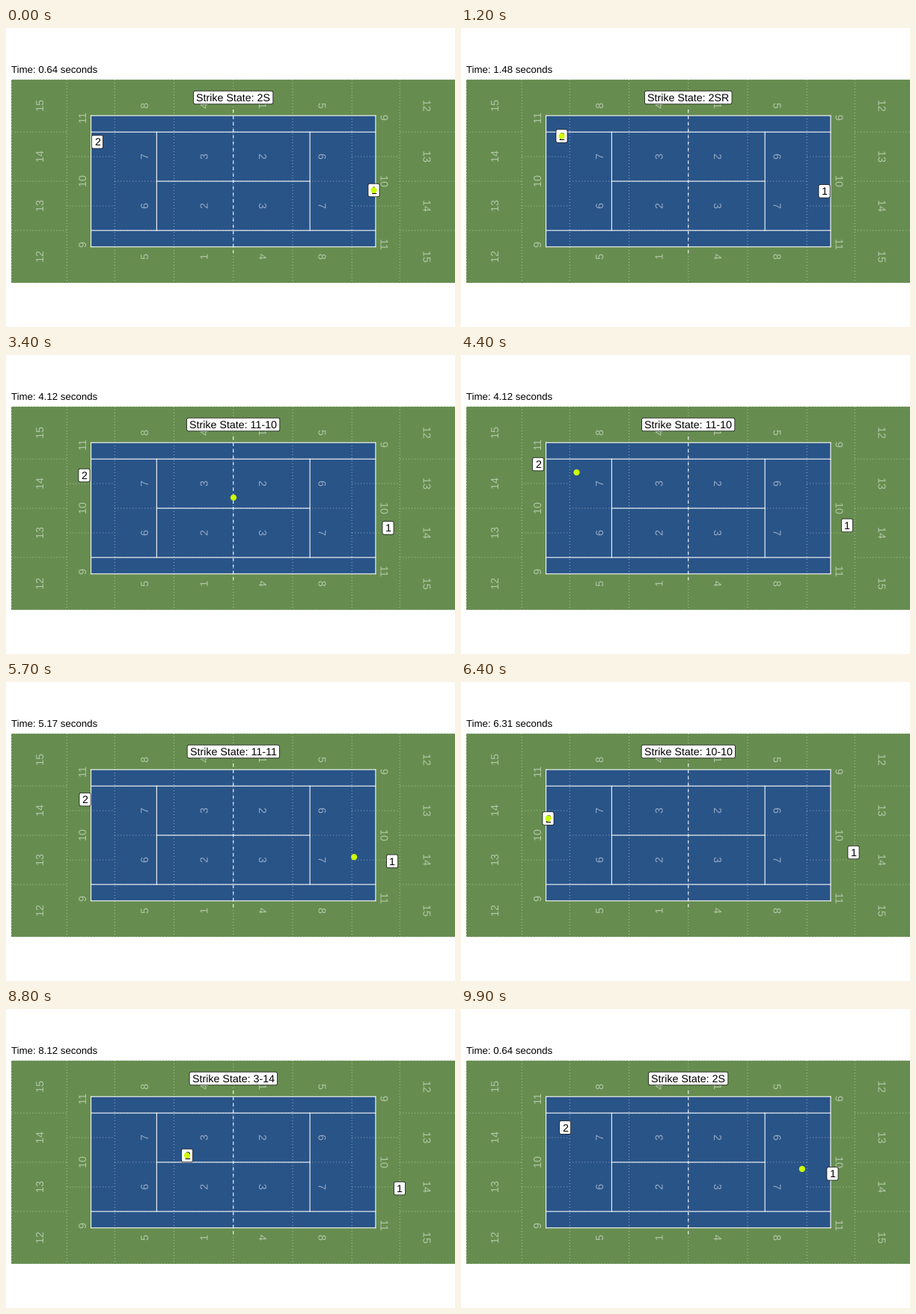
Write a matplotlib script that moves like this. It is 600 px wide and 400 px high and loops after 10000 ms.

```python
import matplotlib.pyplot as plt
import numpy as np
from matplotlib.animation import FuncAnimation
from matplotlib.patches import Circle, FancyBboxPatch, PathPatch, Rectangle
from matplotlib.textpath import TextPath
from matplotlib.transforms import Affine2D

W, H, DPI = 600, 400, 100
PX = 72 / DPI
GRASS, COURT, BALL = "#668d4f", "#295488", "#ccff00"
FONT, SIZE = "Liberation Sans", 14.23
CX, CY, METRE = 303.75, 205, 16  # court centre and scale
plt.rcParams["font.family"] = FONT
plt.rcParams["text.hinting"] = "none"

# Per stroke: clock, strike label, player 1, player 2.
# Player 1 hits the even strokes, player 2 the odd ones.
STROKES = [
    ("0.64", "2S", (491.5, 217), (122, 152.3)),
    ("1.48", "2SR", (485.5, 218.3), (134.5, 144.5)),
    ("2.89", "10-10", (505, 236.5), (106, 177)),
    ("4.12", "11-10", (516, 226), (103, 145)),
    ("5.17", "11-11", (515, 241.5), (104, 153.5)),
    ("6.31", "10-10", (524.5, 228), (116.5, 182.5)),
    ("7.31", "14-7", (535, 246), (163, 196)),
    ("8.12", "3-14", (526, 240), (242, 196)),
]
STARTS = [5, 18, 31, 44, 57, 70, 82, 94]
STEPS = [8, 8, 8, 8, 8, 7, 7, 7]

fig = plt.figure(figsize=(W / DPI, H / DPI), dpi=DPI, facecolor="white")
ax = fig.add_axes([0, 0, 1, 1])
ax.set_xlim(0, W)
ax.set_ylim(H, 0)
ax.axis("off")


def line(x0, y0, x1, y1, **style):
    opts = dict(color="white", lw=1.07 * PX, solid_capstyle="projecting",
                dash_capstyle="butt", snap=False, zorder=3)
    ax.plot([x0, x1], [y0, y1], **{**opts, **style})


def dotted(x0, y0, x1, y1):
    line(x0, y0, x1, y1, lw=PX, ls=(0, (1, 3)), alpha=0.5, zorder=2)


def zone(x, y, name, angle):
    """Faint number turned about its own centre."""
    path = TextPath((0, 0), str(name), size=SIZE, prop={"family": FONT})
    width = 0.556 * SIZE * len(str(name))
    place = (Affine2D().translate(-width / 2, -0.35 * SIZE).scale(1, -1)
             .rotate_deg(-angle).translate(x, y))
    ax.add_patch(PathPatch(place.transform_path(path), fc="white", lw=0,
                           alpha=0.5, zorder=4))


def draw_court():
    half_l, half_w = 11.885 * METRE, 5.485 * METRE
    singles, service, net = 4.115 * METRE, 6.4 * METRE, 6 * METRE
    left, right = CX - half_l, CX + half_l
    top, bottom = CY - half_w, CY + half_w

    ax.add_patch(Rectangle((7.3, 69), 593, 272, fc=GRASS, lw=0))
    ax.add_patch(Rectangle((left, top), 2 * half_l, 2 * half_w, fc=COURT,
                           lw=0, zorder=1, snap=False))

    for x in (7.5, 81.3, 145.3, 224.5, CX, 383, 462.2, 526.2):
        dotted(x, 69, x, 341)
    for y in (69.2, 340.8):
        dotted(7.5, y, 600, y)
    for y in (CY - singles, CY, CY + singles):
        dotted(7.5, y, 81.3, y)
        dotted(145.3, y, 462.2, y)
        dotted(526.2, y, 600, y)
    for y in (172, 238):
        dotted(81.3, y, 145.3, y)
        dotted(462.2, y, 526.2, y)

    for y in (top, CY - singles, CY + singles, bottom):
        line(left, y, right, y)
    for x in (left, right):
        line(x, top, x, bottom)
    for x in (CX - service, CX + service):
        line(x, CY - singles, x, CY + singles)
    line(CX - service, CY, CX + service, CY)
    line(CX, CY - net, CX, CY + net, ls=(0, (4, 4)))

    # The right half is the left half turned about the court centre.
    rows = (104, 172, 238, 306)
    columns = [
        (45, rows, (15, 14, 13, 12)),
        (102, (120, 205, 290), (11, 10, 9)),
        (185, rows, (8, 7, 6, 5)),
        (264.5, rows, (4, 3, 2, 1)),
    ]
    for x, ys, names in columns:
        for y, name in zip(ys, names):
            zone(x, y, name, 90)
            zone(2 * CX - x, 2 * CY - y, name, 270)


class Label:
    """Text in a white rounded box, centred on a point."""

    def __init__(self, text, z):
        self.box = FancyBboxPatch(
            (0, 0), 1, 1, boxstyle="round,pad=0,rounding_size=2.16",
            fc="white", ec="black", lw=0.7 * PX, zorder=z)
        ax.add_patch(self.box)
        self.text = ax.text(0, 0, text, fontsize=SIZE * PX, color="black",
                            ha="center", va="baseline", zorder=z + 0.1)

    def place(self, x, y, width):
        self.box.set_bounds(x - width / 2, y - 8.8, width, 17.6)
        self.text.set_position((x, y + 5))

    def set(self, text, x, y):
        self.text.set_text(text)
        self.place(x, y, self.text.get_window_extent().width + 7.2)


draw_court()
clock = ax.text(6.7, 60.3, "", fontsize=13.2 * PX, color="black",
                va="baseline")
strike = Label("", 5)
players = [Label("1", 6), Label("2", 6)]
ball = Circle((0, 0), 4.1, fc=BALL, lw=0, zorder=8)
ax.add_patch(ball)


def places(i):
    """Player 1, player 2 and ball at stroke i."""
    pair = STROKES[i][2:]
    return np.array([*pair, pair[i % 2]], float)


def moment(frame):
    """Stroke index and progress towards the next one."""
    for i in reversed(range(len(STARTS))):
        if frame >= STARTS[i]:
            return i, min((frame - STARTS[i] + 1) / STEPS[i], 1)
    return 0, 0


def update(frame):
    i, p = moment(frame)
    j = (i + 1) % len(STROKES)
    now = places(i) * (1 - p) + places(j) * p
    for player, (x, y) in zip(players, now):
        player.place(x, y, 15.1)
    ball.center = tuple(now[2])

    time, name = STROKES[j if p >= 0.5 else i][:2]
    clock.set_text(f"Time: {time} seconds")
    strike.set(f"Strike State: {name}", CX, 93)
    return ()


anim = FuncAnimation(fig, update, frames=100, interval=100, repeat=True,
                     repeat_delay=0, blit=False)
plt.show()
```
